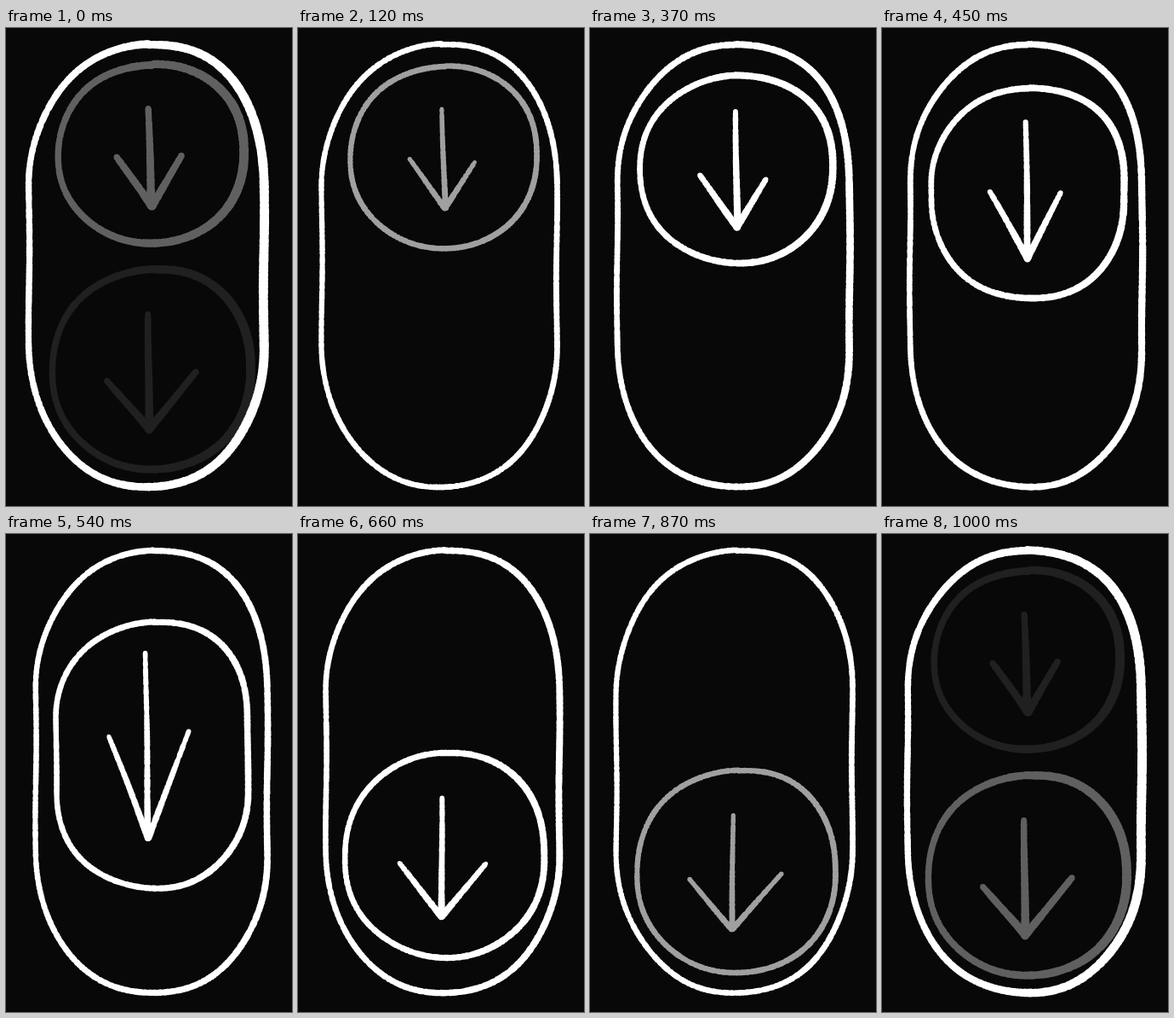
These frames come from a looping animation (336x560 px, 1.12 s). An HTML page with a canvas:

```html
<!DOCTYPE html>
<html lang="en">
<head>
<meta charset="utf-8">
<title>Scroll down</title>
<style>
  html, body { margin: 0; height: 100%; overflow: hidden; background: #080808; }
  canvas { display: block; }
</style>
</head>
<body>
<canvas id="stage" width="336" height="560"></canvas>
<script>
const ctx = document.getElementById("stage").getContext("2d");

// rim: left, right; ring: left, top, right, bottom; arrow: start, tip, left barb, right barb.
const poses = [
  { tone: 96,  weight: 9,   rim: [27, 303], ring: [61, 43, 279, 252],  arrow: [167, 94, 171, 209, 130, 151, 206, 150] },
  { tone: 160, weight: 6.4, rim: [28, 304], ring: [61, 45, 280, 258],  arrow: [169, 95, 173, 211, 131, 154, 208, 157] },
  { tone: 255, weight: 7.6, rim: [32, 305], ring: [58, 56, 285, 275],  arrow: [171, 98, 173, 233, 129, 173, 207, 177] },
  { tone: 255, weight: 6.9, rim: [35, 307], ring: [59, 103, 284, 415], arrow: [164, 139, 167, 356, 121, 237, 215, 231] },
  { tone: 255, weight: 7.1, rim: [33, 307], ring: [55, 257, 289, 496], arrow: [169, 309, 169, 448, 119, 386, 221, 386] },
  { tone: 160, weight: 6.4, rim: [31, 308], ring: [55, 277, 288, 514], arrow: [168, 330, 167, 463, 117, 405, 225, 398] },
  { tone: 96,  weight: 9,   rim: [30, 305], ring: [54, 283, 287, 517], arrow: [167, 335, 168, 470, 119, 413, 223, 403] }
];

// Start time and position along the poses; fractions are in-betweens.
const steps = [
  [0, 0], [120, 1], [250, 1.45], [370, 2], [450, 2.3], [540, 3],
  [580, 3.7], [660, 4], [750, 4.55], [870, 5], [1000, 6]
];
const LOOP = 1120, GHOST = 32, TOP = 19, BOTTOM = 538;

// Superellipse exponents, clockwise from the top right corner.
const bends = [2.3, 2.12, 2.1, 2.05];

let seed;
const random = () => (seed = (seed * 16807) % 2147483647) / 2147483647;

const lerp = (a, b, t) => Array.isArray(a) ? a.map((v, i) => lerp(v, b[i], t)) : a + (b - a) * t;

function poseAt(at) {
  const from = poses[Math.floor(at)], to = poses[Math.ceil(at)], pose = {};
  for (const key in from) pose[key] = lerp(from[key], to[key], at % 1);
  return pose;
}

// Closed outline in a box; corners are `tall` times as high as wide.
function loop([left, top, right, bottom], tall) {
  const cx = (left + right) / 2 + 3;
  const rise = Math.min((bottom - top) / 2, tall * (right - left) / 2);
  const points = [];
  bends.forEach((bend, corner) => {
    const sx = corner < 2 ? 1 : -1, sy = corner % 3 ? 1 : -1;
    const rx = sx > 0 ? right - cx : cx - left;
    const y0 = sy > 0 ? bottom - rise : top + rise;
    for (let i = 0; i <= 40; i++) {
      const angle = (corner - 1 + i / 40) * Math.PI / 2;
      const power = v => Math.abs(v) ** (2 / bend);
      points.push([cx + sx * rx * power(Math.cos(angle)), y0 + sy * rise * power(Math.sin(angle))]);
    }
  });
  return points;
}

// Overlapping uneven dabs along a gently swaying line give the chalky edge.
function chalk(points, width, sway) {
  const phase = random() * 7;
  let walked = 0;
  ctx.beginPath();
  for (let i = 1; i < points.length; i++) {
    const [x0, y0] = points[i - 1], [x1, y1] = points[i];
    const length = Math.hypot(x1 - x0, y1 - y0);
    for (let d = 0; d < length; d += 0.8) {
      const s = (walked + d) / 30 + phase;
      const x = lerp(x0, x1, d / length) + sway * Math.sin(s);
      const y = lerp(y0, y1, d / length) + sway * Math.cos(s * 1.3);
      const r = width(x, d / length) / 2 - 0.4 + random() * 0.7;
      ctx.moveTo(x + r, y);
      ctx.arc(x, y, r, 0, 7);
    }
    walked += length;
  }
  ctx.fill();
}

function outline(box, tall, weight) {
  const [left, , right] = box;
  // Heavy strokes press harder towards the right.
  const lean = (weight - 6) * 0.6;
  chalk(loop(box, tall), x => weight + lean * ((x - left) / (right - left) * 2 - 1), 0.6);
}

function button({ ring, arrow, weight, tone }, shade = tone) {
  seed = Math.round(ring[1] * 977);
  ctx.fillStyle = `rgb(${shade},${shade},${shade})`;
  outline(ring, 1, weight);
  const [x, y, tipX, tipY, ...barbs] = arrow;
  const tip = [tipX, tipY];
  const taper = (_, t) => weight * (0.8 + 0.3 * t);
  for (const start of [[x, y], barbs.slice(0, 2), barbs.slice(2)]) chalk([start, tip], taper, 0.4);
}

function draw(at) {
  const pose = poseAt(at);
  ctx.fillStyle = "#080808";
  ctx.fillRect(0, 0, 336, 560);
  if (at % 6 === 0) button(poseAt(6 - at), GHOST);
  button(pose);
  ctx.fillStyle = "#fff";
  const [left, right] = pose.rim;
  outline([left, TOP, right, BOTTOM], 1.22, pose.weight);
}

let shown;
function tick() {
  const time = performance.now() % LOOP;
  const at = steps.findLast(([start]) => start <= time)[1];
  if (at !== shown) draw(shown = at);
  requestAnimationFrame(tick);
}
tick();
</script>
</body>
</html>
```
